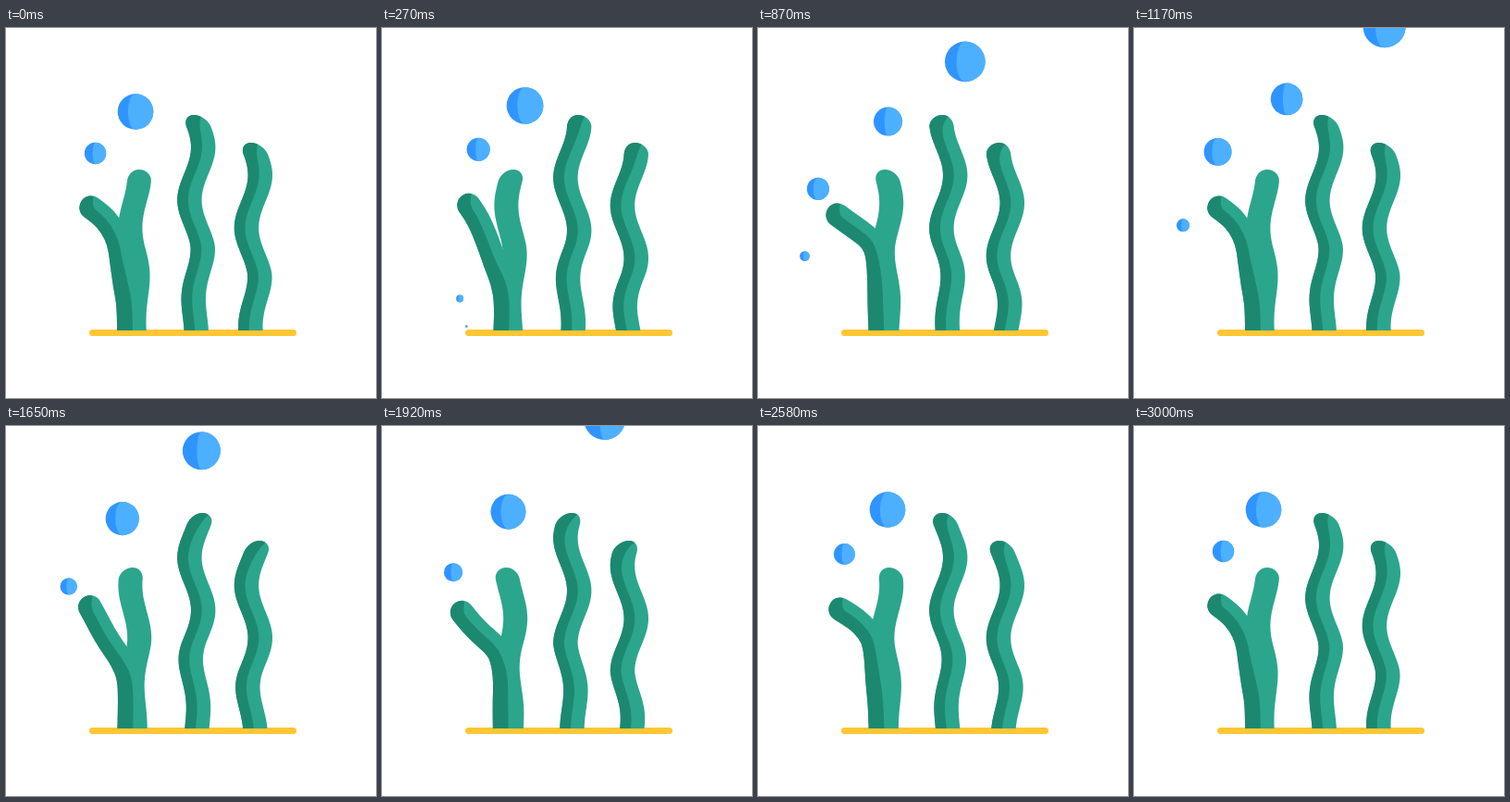
Write an HTML page with a canvas that moves like this. It is 400x400 px and loops after 3.03 s.

```html
<!DOCTYPE html>
<html lang="en">
<head>
<meta charset="utf-8">
<title>Seaweed and bubbles</title>
<style>
  html, body { margin: 0; width: 100%; height: 100%; overflow: hidden; background: #fff; }
  canvas { display: block; }
</style>
</head>
<body>
<canvas id="stage" width="400" height="400"></canvas>
<script>
const ctx = document.getElementById('stage').getContext('2d');
const LOOP = 3030, WAVELENGTH = 114, FLOOR = 327;
const LIGHT = '#2ca58d', DARK = '#1d8870';

const clamp = (v, lo, hi) => Math.max(lo, Math.min(hi, v));

// Two wave cycles per loop, slowing towards the end
function swayCycle(t) {
  const u = Math.min(1, t / 3000);
  return 2 * (u + .145 * Math.sin(Math.PI * u ** 1.4));
}

// Sideways push of the water, fading out towards the root
function wave(y, { crest, amp, end }, cycle) {
  const fade = clamp((end - y) / 105, 0, 1);
  return amp * fade * Math.cos(2 * Math.PI * ((y - crest) / WAVELENGTH + cycle));
}

const weed = (x, top) => ({ x, top, crest: top + 35, amp: 7.4, half: 13.2, end: top + 246 });
const weeds = [weed(205.8, 94), weed(267.4, 124)];
const stem = { x: 139.3, top: 153, crest: 159, amp: 4.9, half: 13, end: 340 };

// Resting centre line of the coral's left branch
const branch = [[90, 197], [99, 206.5], [109.5, 219.5], [120, 234.5], [126, 250], [131, 274], [132.8, 300], [132.8, 340]];

// A bubble rises along a curve to its resting place, and drifts off in the next loop
const bubbles = [
  { birth: 41, settle: 2190, radius: 19.3, shine: .42,
    curve: [[170, 335], [-25, 281], [65, 135.5], [140, 90.5]], drift: [130.5, -92, 3.7] },
  { birth: 110, settle: 3000, radius: 11.7, shine: .24,
    curve: [[121, 341], [15, 290], [46.5, 182], [96.5, 135.5]], drift: [68.5, -58.5, 5.6] }
];

function fillPath(path, color) {
  ctx.fillStyle = color;
  ctx.fill(path);
}

function smoothPath(points) {
  const path = new Path2D();
  path.moveTo(...points[0]);
  for (let i = 1; i < points.length - 1; i++) {
    const [x, y] = points[i], [nx, ny] = points[i + 1];
    path.quadraticCurveTo(x, y, (x + nx) / 2, (y + ny) / 2);
  }
  path.lineTo(...points[points.length - 1]);
  return path;
}

// A round-topped blade bent by the wave; edge(depth, halfWidth) gives its right side
function bladePath(blade, cycle, edge) {
  const { x, top, half } = blade, left = [], right = [];
  for (let y = top; y <= FLOOR + 1; y += y < top + 3 ? .25 : 1) {
    const depth = y - top;
    const w = Math.sqrt(half ** 2 - Math.max(0, half - depth) ** 2);
    const mid = x + wave(y, blade, cycle);
    left.push([mid - w, y]);
    right.unshift([mid + edge(depth, w), y]);
  }
  const path = new Path2D();
  left.concat(right).forEach(p => path.lineTo(...p));
  return path;
}

const fullEdge = (depth, w) => w;
const shadeEdge = (depth, w) => clamp(10 * Math.exp(-depth / 10) - 1.5, -w, w);

function drawWeed(blade, cycle) {
  fillPath(bladePath(blade, cycle, fullEdge), LIGHT);
  fillPath(bladePath(blade, cycle, shadeEdge), DARK);
}

function drawCoral(cycle) {
  const spine = branch.map(([x, y]) => {
    const push = wave(y, stem, cycle);
    return [x - .85 * push, y + 1.15 * push];
  });
  const [tipX, tipY] = spine[0];
  const limb = smoothPath(spine);
  const shade = smoothPath([
    [tipX + 3, tipY - 14],
    ...spine.map(([x, y]) => [x + 4 * clamp((y - 245) / 35, 0, 1), y - 1])
  ]);
  shade.lineTo(60, 340);
  shade.lineTo(60, tipY - 14);

  fillPath(bladePath(stem, cycle, fullEdge), LIGHT);
  ctx.lineWidth = 25.5;
  ctx.strokeStyle = LIGHT;
  ctx.stroke(limb);
  ctx.save();
  ctx.clip(shade);
  ctx.strokeStyle = DARK;
  ctx.stroke(limb);
  ctx.restore();
}

function drawGround() {
  ctx.strokeStyle = '#ffc633';
  ctx.lineWidth = 7;
  ctx.beginPath();
  ctx.moveTo(93.5, 329.5);
  ctx.lineTo(310.5, 329.5);
  ctx.stroke();
}

function bezier(points, q) {
  const p = 1 - q, weights = [p ** 3, 3 * q * p * p, 3 * q * q * p, q ** 3];
  return [0, 1].map(axis => weights.reduce((sum, w, i) => sum + w * points[i][axis], 0));
}

function drawBubble({ birth, settle, radius, shine, curve, drift }, age) {
  if (age <= birth) return;
  const grown = 1 - (1 - Math.min(1, (age - birth) / (settle - birth))) ** 2;
  const away = Math.max(0, age - LOOP) / 1170;
  let [x, y] = bezier(curve, grown);
  x += drift[0] * away ** 1.5;
  y += drift[1] * away ** 1.8;
  const r = radius * grown + drift[2] * away ** 1.3;

  const disc = new Path2D(), glow = new Path2D();
  disc.arc(x, y, r, 0, 2 * Math.PI);
  glow.arc(x, y, r, -Math.PI / 2, Math.PI / 2);
  glow.ellipse(x, y, r * shine, r, 0, Math.PI / 2, Math.PI * 1.5);
  fillPath(disc, '#3094ff');
  fillPath(glow, '#4db0ff');
}

function draw(t) {
  const cycle = swayCycle(t);
  ctx.clearRect(0, 0, 400, 400);
  ctx.lineCap = ctx.lineJoin = 'round';
  drawGround();
  ctx.save();
  ctx.beginPath();
  ctx.rect(0, 0, 400, FLOOR);
  ctx.clip();
  drawCoral(cycle);
  weeds.forEach(blade => drawWeed(blade, cycle));
  ctx.restore();
  for (const bubble of bubbles) {
    drawBubble(bubble, t);
    drawBubble(bubble, t + LOOP);
  }
}

const start = performance.now();
function tick() {
  draw((performance.now() - start) % LOOP);
  requestAnimationFrame(tick);
}
tick();
</script>
</body>
</html>
```
